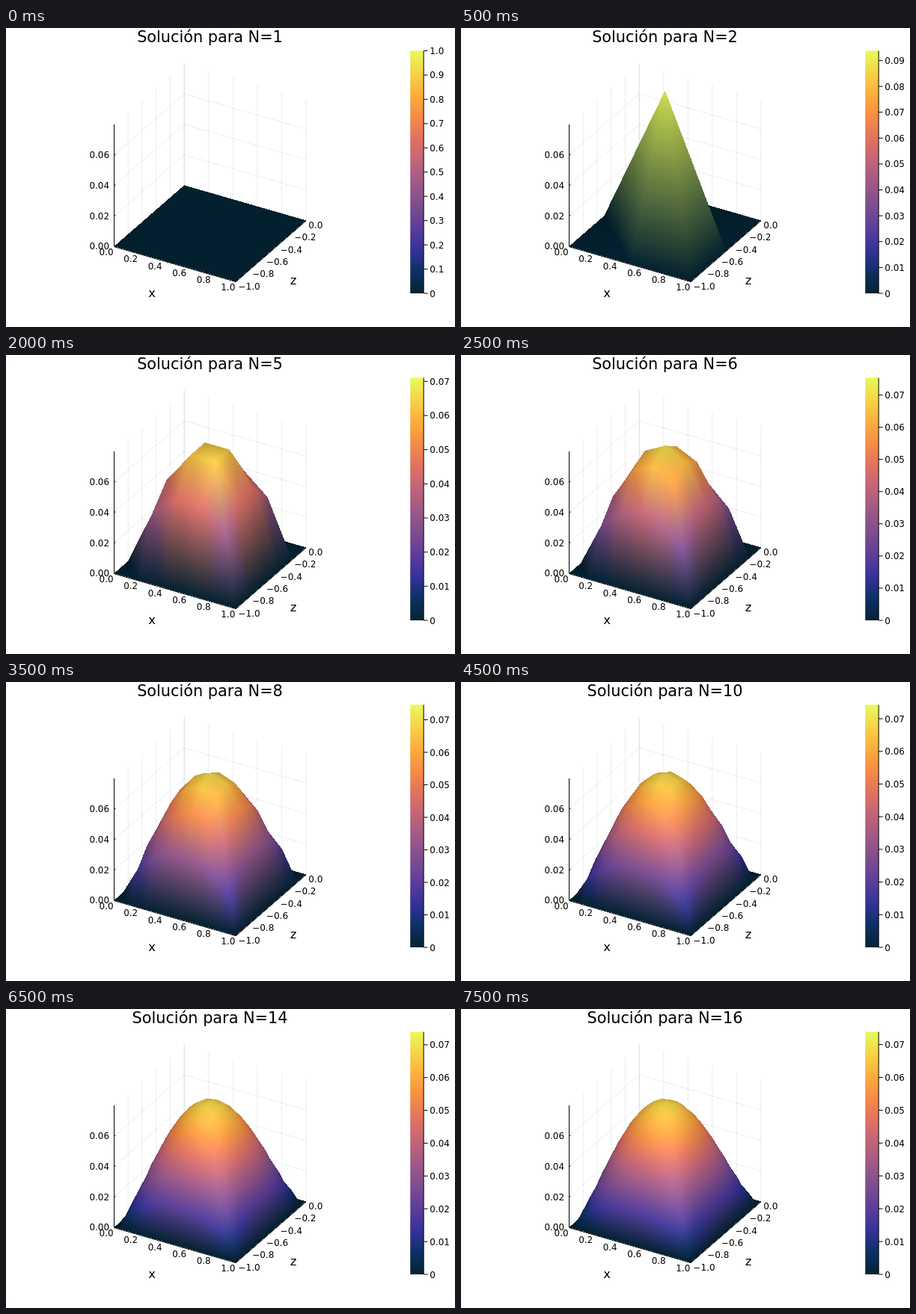
Recreate the animation shown at these times as an HTML page with a canvas. Size 600 by 400 pixels, loop 8 s.

```html
<!DOCTYPE html>
<html lang="es">
<head>
<meta charset="utf-8">
<style>
html, body { margin: 0; width: 100%; height: 100%; overflow: hidden; background: #fff; }
canvas { display: block; }
</style>
</head>
<body>
<canvas id="stage" width="600" height="400"></canvas>
<script>
const W = 600, H = 400, STEP = 500, COUNT = 16, Z_MAX = 0.08;
const TICK = 11.9, GUIDE = 16.3, TITLE = 20.8;
const ctx = document.getElementById('stage').getContext('2d');

const THERMAL = [
  [4, 35, 51], [13, 48, 100], [53, 50, 155], [93, 62, 153], [126, 77, 143], [158, 89, 135],
  [193, 100, 121], [225, 113, 97], [246, 139, 69], [251, 173, 60], [246, 211, 70], [232, 250, 91]
];

function thermal(v) {
  const p = Math.min(Math.max(v, 0), 1) * (THERMAL.length - 1);
  const i = Math.min(Math.floor(p), THERMAL.length - 2);
  return THERMAL[i].map((c, k) => c + (THERMAL[i + 1][k] - c) * (p - i));
}

// Orthographic view of x in [0,1], z in [-1,0] and height u
const project = (x, z, u = 0) =>
  [144.5 + 162.7 * x + 93.7 * (z + 1), 292 + 47 * x - 81.6 * (z + 1) - 163 * u / Z_MAX];

// Bilinear finite elements for -Δu = 1 on an n by n mesh, zero on the boundary
function solve(n) {
  const u = Array.from({ length: n + 1 }, () => new Float64Array(n + 1));
  for (let pass = 0; pass < 500; pass++) {
    for (let j = 1; j < n; j++) {
      for (let i = 1; i < n; i++) {
        const a = u[j - 1], b = u[j], c = u[j + 1];
        b[i] = (3 / (n * n) + a[i - 1] + a[i] + a[i + 1] + b[i - 1] + b[i + 1]
          + c[i - 1] + c[i] + c[i + 1]) / 8;
      }
    }
  }
  return u;
}

// Colour of a mesh vertex by its height on the axis, lit from the viewer's side
function shade(u, i, j, n) {
  const slope = (hi, lo, cells) => (hi - lo) * n / cells / Z_MAX;
  const i0 = Math.max(i - 1, 0), i1 = Math.min(i + 1, n);
  const j0 = Math.max(j - 1, 0), j1 = Math.min(j + 1, n);
  const gx = slope(u[j][i1], u[j][i0], i1 - i0);
  const gz = slope(u[j1][i], u[j0][i], j1 - j0);
  const light = Math.max(0, (-0.433 * gx + 0.75 * gz + 0.5) / Math.hypot(gx, gz, 1));
  const v = u[j][i] / Z_MAX;
  const gloss = 18 * light ** 6 * Math.min(1, 5 * v);
  return thermal(v).map(c => c * (0.78 + 0.22 * light) + gloss);
}

function fillTriangle(image, a, b, c) {
  const [ax, ay] = a.at, [bx, by] = b.at, [cx, cy] = c.at;
  const area = (bx - ax) * (cy - ay) - (cx - ax) * (by - ay);
  if (Math.abs(area) < 1e-6) return;
  const x0 = Math.floor(Math.min(ax, bx, cx)), x1 = Math.ceil(Math.max(ax, bx, cx));
  const y0 = Math.floor(Math.min(ay, by, cy)), y1 = Math.ceil(Math.max(ay, by, cy));
  for (let y = y0; y <= y1; y++) {
    for (let x = x0; x <= x1; x++) {
      const px = x + 0.5 - ax, py = y + 0.5 - ay;
      const s = (px * (cy - ay) - (cx - ax) * py) / area;
      const t = ((bx - ax) * py - px * (by - ay)) / area;
      if (s < -1e-9 || t < -1e-9 || s + t > 1 + 1e-9) continue;
      const o = (y * W + x) * 4;
      for (let k = 0; k < 3; k++) {
        image.data[o + k] = a.rgb[k] * (1 - s - t) + b.rgb[k] * s + c.rgb[k] * t;
      }
      image.data[o + 3] = 255;
    }
  }
}

function buildSurface(n) {
  const u = solve(n);
  const max = Math.max(...u.map(row => Math.max(...row))) || 1;
  const points = u.map((row, j) => Array.from(row, (h, i) => ({
    at: project(i / n, j / n - 1, h),
    rgb: shade(u, i, j, n)
  })));
  const image = new ImageData(W, H);
  // Back to front
  for (let j = n - 1; j >= 0; j--) {
    for (let i = 0; i < n; i++) {
      const p = points[j][i], q = points[j][i + 1], r = points[j + 1][i], s = points[j + 1][i + 1];
      fillTriangle(image, r, q, s);
      fillTriangle(image, p, q, r);
    }
  }
  const canvas = document.createElement('canvas');
  canvas.width = W;
  canvas.height = H;
  canvas.getContext('2d').putImageData(image, 0, 0);
  return { canvas, max };
}

function text(str, x, y, size, align) {
  ctx.font = size + 'px "DejaVu Sans", sans-serif';
  ctx.textAlign = align;
  ctx.fillStyle = '#000';
  ctx.fillText(str, x, y);
}

function line(color, ...points) {
  ctx.strokeStyle = color;
  ctx.beginPath();
  points.forEach(p => ctx.lineTo(...p));
  ctx.stroke();
}

function drawGrid() {
  const color = 'rgba(0,0,0,0.08)';
  for (let k = 0; k <= 5; k++) {
    const v = k / 5;
    line(color, project(0, v - 1), project(0, v - 1, Z_MAX));
    line(color, project(v, 0), project(v, 0, Z_MAX));
  }
  for (let k = 0; k < 4; k++) {
    const u = k * 0.02;
    line(color, project(0, -1, u), project(0, 0, u), project(1, 0, u));
  }
}

function drawAxes() {
  line('#000', project(0, -1, Z_MAX), project(0, -1));
  const edge = [project(0, -1), project(1, -1), project(1, 0)];
  line('#000', ...edge.map(([x, y]) => [x, y + 0.6]));
  for (let k = 0; k < 4; k++) {
    const [x, y] = project(0, -1, k * 0.02);
    line('#000', [x, y], [x + 2, y - 0.6]);
    text((k * 0.02).toFixed(2), 138, y + 4.3, TICK, 'right');
  }
  for (let k = 0; k <= 5; k++) {
    const v = k / 5;
    const [x, y] = project(v, -1);
    text(v.toFixed(1), x - 1, y + 11.8, TICK, 'right');
    const [zx, zy] = project(1, v - 1);
    text((k < 5 ? '−' : '') + (1 - v).toFixed(1), zx + 3.4, zy + 10.6, TICK, 'left');
  }
  text('x', 195, 360, GUIDE, 'center');
  text('z', 384, 343, GUIDE, 'center');
}

function drawColorbar(max) {
  const top = 30.5, bottom = 355, right = 558.1;
  const ramp = ctx.createLinearGradient(0, bottom, 0, top);
  THERMAL.forEach((c, i) => ramp.addColorStop(i / (THERMAL.length - 1), `rgb(${c})`));
  ctx.fillStyle = ramp;
  ctx.fillRect(540.2, top, right - 540.2, bottom - top);
  line('#000', [right, top], [right, bottom]);
  const digits = max === 1 ? 1 : 2;
  const gap = 10 ** -digits;
  for (let k = 0; k * gap <= max + 1e-9; k++) {
    const y = bottom - (bottom - top) * k * gap / max;
    line('#000', [right, y], [right + 5.5, y]);
    text(k ? (k * gap).toFixed(digits) : '0', 566.3, y + 4.5, TICK, 'left');
  }
}

const surfaces = Array.from({ length: COUNT }, (_, i) => buildSurface(i + 1));
let shown = 0;

function draw(n) {
  const { canvas, max } = surfaces[n - 1];
  ctx.fillStyle = '#fff';
  ctx.fillRect(0, 0, W, H);
  ctx.lineWidth = 1;
  drawGrid();
  ctx.drawImage(canvas, 0, 0);
  drawAxes();
  drawColorbar(max);
  text('Solución para N=' + n, 272.5, 18.9, TITLE, 'center');
}

function tick(now) {
  const n = Math.floor(now / STEP) % COUNT + 1;
  if (n !== shown) draw(shown = n);
  requestAnimationFrame(tick);
}

tick(performance.now());
</script>
</body>
</html>
```
